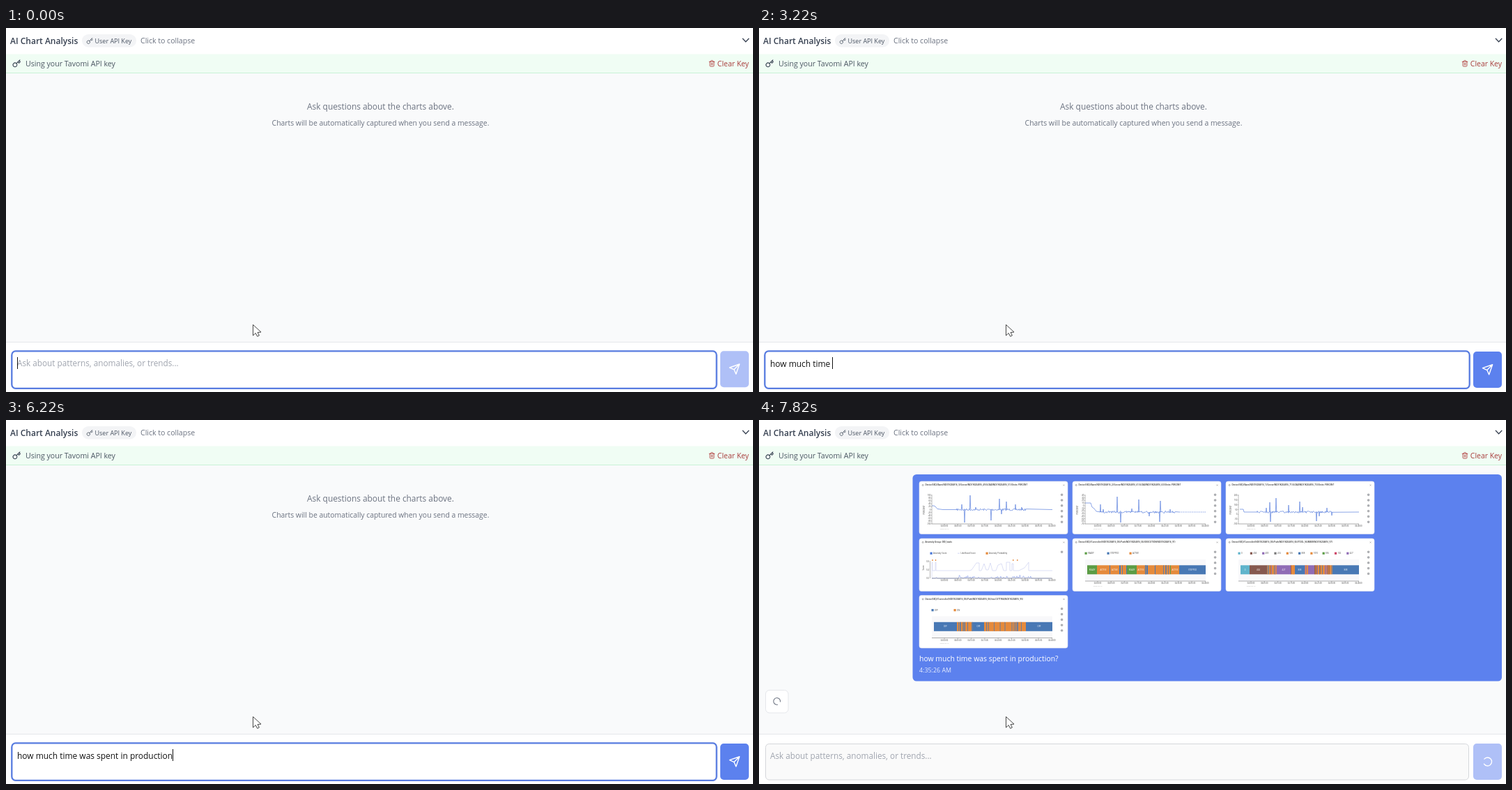
An HTML page that plays this animation: 1072 by 522 pixels, repeating every 8 s.

```html
<!DOCTYPE html>
<html lang="en">
<head>
<meta charset="utf-8">
<title>Chart chat</title>
<style>
  html, body { margin: 0; width: 100%; height: 100%; overflow: hidden; background: #fff; }
  svg { display: block; width: 100vw; height: 100vh; }
  text { font-family: "Open Sans", "Noto Sans", sans-serif; white-space: pre; }
  .icon { fill: none; stroke-width: 2; stroke-linecap: round; stroke-linejoin: round; }
</style>
</head>
<body>
<svg id="stage" viewBox="0 0 1072 522"></svg>
<script>
const BLUE = '#5c81ee', PALE = '#afc0f7', GREY = '#6b7280';
const MESSAGE = 'how much time was spent in production?';
const PROMPT = 'Ask about patterns, anomalies, or trends...';
const LOOP = 8000, SEND = 7220, REPLY = 7620;

// [time, typed characters, caret visible]
const STEPS = [
  [0, 0, 1], [400, 0, 0], [1000, 2, 1], [1210, 4, 1],
  [1610, 5, 1], [1810, 6, 1], [2020, 7, 1], [2220, 8, 1], [2420, 10, 1], [2620, 11, 1],
  [2820, 12, 1], [3020, 13, 1], [3220, 14, 1], [3420, 15, 1], [3620, 16, 1], [3820, 17, 1],
  [4020, 18, 1], [4220, 20, 1], [4420, 21, 1], [4620, 22, 1], [4820, 24, 1], [5020, 25, 1],
  [5220, 27, 1], [5420, 29, 1], [5620, 31, 1], [5820, 33, 1], [6020, 35, 1], [6220, 37, 1],
  [6820, 37, 0], [7020, 38, 1], [SEND, 38, 0], [7430, 38, 0], [REPLY, 0, 0], [7820, 0, 0]
];

const ICONS = {
  key: 'M21 2l-2 2m-7.61 7.61a5.5 5.5 0 1 1-7.778 7.778 5.5 5.5 0 0 1 7.777-7.777zm0 0L15.5 7.5m0 0l3 3L22 7l-3-3m-3.5 3.5L19 4',
  trash: 'M3 6h18M19 6v14c0 1-1 2-2 2H7c-1 0-2-1-2-2V6M8 6V4c0-1 1-2 2-2h4c1 0 2 1 2 2v2M10 11v6M14 11v6',
  send: 'M22 2 11 13M22 2 15 22 11 13 2 9Z',
  spinner: 'M21 12a9 9 0 1 1-6.219-8.56'
};

const text = (x, y, str, size, fill, extra = '') =>
  `<text x="${x}" y="${y}" font-size="${size}" fill="${fill}" ${extra}>${str}</text>`;
const rect = (x, y, w, h, fill, extra = '') =>
  `<rect x="${x}" y="${y}" width="${w}" height="${h}" fill="${fill}" ${extra}/>`;
const path = (d, stroke, width, extra = '') =>
  `<path d="${d}" fill="none" stroke="${stroke}" stroke-width="${width}" ${extra}/>`;
const icon = (name, x, y, scale, color) =>
  `<path class="icon" d="${ICONS[name]}" stroke="${color}" transform="translate(${x} ${y}) scale(${scale})"/>`;
const spinner = (x, y, scale, color, id) =>
  `<g transform="translate(${x} ${y}) scale(${scale})"><path id="${id}" class="icon" d="${ICONS.spinner}" stroke="${color}"/></g>`;

function seeded(seed) {
  return () => (seed = (seed * 16807) % 2147483647) / 2147483647;
}

// ---- Chart cards, in coordinates relative to each 213 x 75 card ----
const CENTER = 'text-anchor="middle"';
const serial = n => 'ND31K204816_' + n;
const SERIES = '#6688df', STEEL = '#4878b4', ORANGE = '#e58a3c', GREEN = '#5b9c45',
      BROWN = '#85584f', PURPLE = '#8f6bb5', TEAL = '#5fb4cc';

function card(x, y, title, tools, body) {
  let out = rect(0, 0, 213, 75.5, '#fff', 'rx="3" stroke="#e2e5ee" stroke-width=".6"');
  out += '<circle cx="5.2" cy="5.4" r="1" fill="none" stroke="#777" stroke-width=".6"/>';
  out += text(8.5, 6.2, title, 3, '#333', 'font-weight="600"');
  out += path('M206.6 4.6l1.8 1.8m0-1.8l-1.8 1.8', '#777', .5);
  for (let i = 0; i < tools; i++)
    out += rect(203.4, 18 + i * 7.8, 2.4, 2.4, '#b9bcc4', 'rx=".6" stroke="#777" stroke-width=".5"');
  return `<g transform="translate(${x} ${y})">${out}${body}</g>`;
}

function timeAxis(y, date = true) {
  let out = path(`M18 ${y}H191`, '#777', .6);
  for (let i = 0; i < 9; i++) {
    const x = 36 + i * 19.3, minute = String(i * 5).padStart(2, '0');
    out += path(`M${x} ${y}v1.4`, '#777', .5);
    out += text(x, y + 4.4, `04:${minute}:00`, 2.6, '#444', CENTER);
  }
  return out + (date ? text(36, y + 8, '2025-03-14', 2.5, '#aaa', CENTER) : '');
}

function lineCard(x, y, ids, o) {
  const random = seeded(o.seed);
  let d = o.start;
  for (let px = o.from; px < o.to; px += .8)
    d += `L${px} ${(o.base + (random() - .5) * 3).toFixed(1)}`;
  d += `L${o.end} ${o.base}`;
  for (const [sx, sy] of o.spikes) d += `M${sx - .7} ${o.base}L${sx} ${sy}L${sx + .8} ${o.base}`;
  let body = path(d, SERIES, .75);
  if (o.end < 191) body += path(`M${o.end} ${o.base}H191`, SERIES, .7, 'stroke-dasharray="1.6 1"');
  body += path('M18 19V61', '#777', .5);
  for (let i = 0; i < o.ticks; i++) {
    const ty = 20 + i * 41 / (o.ticks - 1);
    body += path(`M16.8 ${ty}h1.2`, '#777', .5);
    body += text(16.4, ty + 1, o.top - i * o.stepSize, 2.7, '#444', 'text-anchor="end"');
  }
  body += text(0, 0, 'PERCENT', 3, '#444', `${CENTER} transform="translate(7.5 41) rotate(-90)"`);
  const [a, b, c] = ids.map(serial);
  return card(x, y, `Device(SEQ)/Axes(${a})/Linear(${b})/LOAD(${c})/Units: PERCENT`, 6, body + timeAxis(61));
}

function legend(items, x, gap) {
  return items.map(([label, color], i) =>
    rect(x + i * gap, 19.6, 3.2, 3.2, color) + text(x + 4.5 + i * gap, 22.3, label, 2.8, '#444')).join('');
}

// Each run is [end, colour or list of colours for stripes, label]
function bandCard(x, y, title, legendMarkup, start, runs, seed) {
  const random = seeded(seed);
  let body = rect(18, 30, 173, 31, '#f8f8fa') + legendMarkup, px = start;
  for (const [end, colors, label] of runs) {
    if (typeof colors === 'string') {
      body += rect(px, 38.3, end - px, 13, colors);
      if (label) body += text((px + end) / 2, 45.8, label, 2.8, '#fff', CENTER);
    } else {
      body += rect(px, 38.3, end - px, 13, colors[0]);
      for (let sx = px; sx < end - .8; sx += .7 + random() * 1.5)
        body += rect(sx.toFixed(1), 38.3, .8, 13, colors[Math.floor(random() * colors.length)]);
    }
    px = end;
  }
  return card(x, y, title, 5, body + timeAxis(61));
}

function anomalyCard(x, y) {
  const random = seeded(31);
  let body = legend([['Anomaly Score', '#4a78d8']], 15.5, 0)
    + path('M55 21.2h3', '#d5d9f5', 1) + text(59.5, 22.3, 'Likelihood Score', 2.8, '#444')
    + `<g transform="translate(80 0)">${legend([['Anomaly Probability', ORANGE]], 15.5, 0)}</g>`;
  body += path('M18 56V34H19V46H23V34H24V46H72L75 45 82 35H86V46H89L93 36 96 45H99L102 35 105 46H110L113 38 118 36 121 46H125V34H130V46H133V36H135V46H143L151 42 157 34V46H191', '#cdd2f1', .7);
  let d = 'M18 57';
  for (let px = 19; px < 190; px += 1.1) {
    const busy = px < 25 || (px > 54 && px < 160);
    d += `L${px.toFixed(1)} ${(57 - (busy ? random() ** 5 * 5 : 0)).toFixed(1)}`;
  }
  body += path(d, '#7d93e4', .6);
  for (const px of [19, 23.5, 134.8, 140.8]) body += `<circle cx="${px}" cy="31" r=".9" fill="${ORANGE}"/>`;
  ['0.8', '0.4', '0.0'].forEach((label, i) =>
    body += text(14, 34 + i * 12, label, 2.7, '#444', 'text-anchor="end"'));
  body += path('M15.5 32V57', '#777', .5);
  body += text(0, 0, 'Score', 2.8, '#444', `${CENTER} transform="translate(7 42) rotate(-90)"`);
  return card(x, y, 'Anomaly Group: 000_loads', 1, body + timeAxis(57, false));
}

function cards() {
  const controller = (n, rest) => `Device(SEQ)/Controller(${serial('05')})/Path(${serial('06')})/${rest}(${serial(n)})`;
  const mix = [ORANGE, STEEL, ORANGE, BROWN, PURPLE];
  const tools = ['0', '404', '405', '414', '506', '808', '1010', '836', '102', '427'];
  const toolColors = [TEAL, BROWN, PURPLE, '#777', ORANGE, STEEL, ORANGE, GREEN, '#c46', PURPLE];
  return [
    lineCard(230, 88, [3, 49, 51], {
      seed: 7, base: 40.5, start: 'M18 35H21L23 36 26 39.5 34 40.5 54 40.5', from: 54, to: 154, end: 191,
      ticks: 11, top: 100, stepSize: 20,
      spikes: [[61, 33], [65, 59], [73, 20], [81, 37], [103, 56], [115, 25], [118, 47], [125, 29], [138, 33], [147, 37]]
    }),
    lineCard(450, 88, [2, 61, 63], {
      seed: 19, base: 44, start: 'M18 31H26L28 37 31 39 34 43 40 44', from: 40, to: 148, end: 153,
      ticks: 12, top: 40, stepSize: 10,
      spikes: [[40, 33], [44, 40], [64, 22], [69, 59], [85, 39], [95, 26], [110, 50], [125, 58], [126, 28], [140, 40]]
    }),
    lineCard(670, 88, [1, 71, 73], {
      seed: 43, base: 44, start: 'M20 40H25L26 44 45 44', from: 45, to: 153, end: 191,
      ticks: 7, top: 200, stepSize: 50,
      spikes: [[58, 38], [63, 30], [64, 58], [72, 24], [90, 34], [106, 29], [110, 37], [130, 57], [134, 50], [145, 38], [152, 49]]
    }),
    anomalyCard(230, 170),
    bandCard(450, 170, controller(91, 'EXECUTION'),
      legend([['READY', GREEN], ['STOPPED', STEEL], ['ACTIVE', ORANGE]], 17.5, 32), 21, [
        [35, GREEN, 'READY'], [53, ORANGE, 'ACTIVE'], [54, STEEL], [67, ORANGE, 'ACTIVE'], [69, STEEL],
        [77, [ORANGE, ORANGE, STEEL]], [78, STEEL], [92, GREEN, 'READY'], [104, ORANGE, 'ACTIVE'],
        [108, [STEEL, ORANGE]], [118, ORANGE], [119, STEEL], [140, [ORANGE, ORANGE, ORANGE, STEEL]],
        [141, GREEN], [153, ORANGE, 'ACTIVE'], [191, STEEL, 'STOPPED']
      ], 11),
    bandCard(670, 170, controller(97, 'TOOL_NUMBER'),
      legend(tools.map((label, i) => [label, toolColors[i]]), 17.5, 17.3), 21, [
        [34, TEAL, '0'], [59, BROWN, '404'], [73, mix], [93, PURPLE, '427'], [99, mix],
        [113, STEEL, '808'], [118, mix], [127, PURPLE], [153, mix], [191, STEEL, '808']
      ], 23),
    bandCard(230, 251.5, controller(95, 'ms:CUTTING'),
      legend([['OFF', STEEL], ['ON', ORANGE]], 17.5, 32), 21, [
        [54, STEEL, 'OFF'], [77, [ORANGE, ORANGE, STEEL]], [93, STEEL, 'OFF'],
        [125, [ORANGE, ORANGE, STEEL]], [153, [ORANGE, ORANGE, ORANGE, STEEL]], [191, STEEL, 'OFF']
      ], 37)
  ].join('');
}

// ---- Page ----
const header =
  text(6, 22.6, 'AI Chart Analysis', 12, '#374151', 'font-weight="600"')
  + rect(109, 9, 78, 18.5, '#f3f4f6', 'rx="9.2"')
  + icon('key', 115.2, 13.8, .41, '#4b5563')
  + text(127.5, 21.8, 'User API Key', 9, '#4b5563')
  + text(193, 22.2, 'Click to collapse', 10.55, GREY)
  + path('M1057.3 15.3l4.3 4.4 4.3-4.4', '#374151', 1.3, 'stroke-linecap="round"')
  + rect(0, 37.5, 1072, 27, '#f0fdf4') + rect(0, 64, 1072, 1, '#c9f2d6')
  + icon('key', 9, 44.8, .52, '#374151')
  + text(28, 55, 'Using your Tavomi API key', 10.6, '#4b5563')
  + icon('trash', 1008, 45.8, .42, '#b03a3a')
  + text(1066, 55, 'Clear Key', 10.45, '#a83c3c', 'text-anchor="end"');

const hints = `<g id="hints">${
  text(537.5, 117.3, 'Ask questions about the charts above.', 11.9, GREY, CENTER)
  + text(537.5, 140.3, 'Charts will be automatically captured when you send a message.', 10.4, GREY, CENTER)}</g>`;

const chat = `<g id="chat">${
  rect(220.5, 78, 845.5, 296.5, BLUE, 'rx="5.5"') + cards()
  + text(230, 345.6, MESSAGE, 10.45, '#fff')
  + text(230, 361.8, '4:35:26 AM', 8.9, '#e6ecfd')
  + rect(9.5, 387.5, 32.5, 32.5, '#fff', 'rx="5.5" stroke="#e5e7eb"')
  + spinner(25.7, 403.4, .54, GREY, 'replySpinner')}</g>`;

const footer =
  rect(0, 450, 1072, 72, '#fff') + rect(0, 450, 1072, 1, '#e5e7eb')
  + rect(8.3, 463.4, 1011.4, 53.4, '#fff', `id="focused" rx="5.5" stroke="#587ce0" stroke-width="2.3"`)
  + rect(9.5, 464.5, 1009, 51.5, '#fafafa', 'id="disabled" rx="5" stroke="#d5d7db"')
  + text(16, 486, '', 11.95, '#111', 'id="typed"')
  + text(16, 486, PROMPT, 11.75, '#a0a5af', 'id="prompt"')
  + rect(16, 472, 1, 17, '#111', 'id="caret"')
  + `<g id="button">${rect(1025, 464, 41, 52, BLUE, 'id="buttonFace" rx="5"')
    + icon('send', 1037, 481.3, .71, '#fff').replace('<path', '<path id="sendIcon"')
    + spinner(1045.5, 490, .67, '#fff', 'sendSpinner')}</g>`;

const pointer = '<path d="M354.5 425.5V441l3.7-3.4 2.5 4.7 2.7-1.3-2.3-4.5 4.9-.4Z" fill="#fff" stroke="#333" stroke-width=".9"/>';

const $ = id => document.getElementById(id);
$('stage').innerHTML = rect(0, 0, 1072, 522, '#fff') + rect(0, 65, 1072, 385, '#f9fafb')
  + header + hints + chat + footer + pointer;

const show = (id, on) => $(id).setAttribute('visibility', on ? 'visible' : 'hidden');
const spin = (id, elapsed) =>
  $(id).setAttribute('transform', `rotate(${elapsed * .36}) translate(-12 -12)`);

function render(now) {
  const t = now % LOOP;
  const [time, count, caretOn] = STEPS.findLast(step => step[0] <= t);
  const sending = time >= SEND, replied = time >= REPLY, idle = !count && !sending;

  show('hints', !replied);
  show('chat', replied);
  show('focused', !sending);
  show('disabled', sending);
  show('prompt', !count);
  show('caret', caretOn);
  show('sendIcon', !sending);
  show('sendSpinner', sending);

  $('typed').textContent = MESSAGE.slice(0, count);
  const width = count ? $('typed').getComputedTextLength() : 0;
  $('caret').setAttribute('x', Math.floor(16 + width));
  $('prompt').setAttribute('y', idle ? 485.3 : 486);
  $('button').setAttribute('transform', `translate(0 ${idle ? -.7 : 0})`);
  $('buttonFace').setAttribute('fill', idle || sending ? PALE : BLUE);
  spin('sendSpinner', time - 7210);
  spin('replySpinner', time - 7600);
  requestAnimationFrame(render);
}
requestAnimationFrame(render);
</script>
</body>
</html>
```
